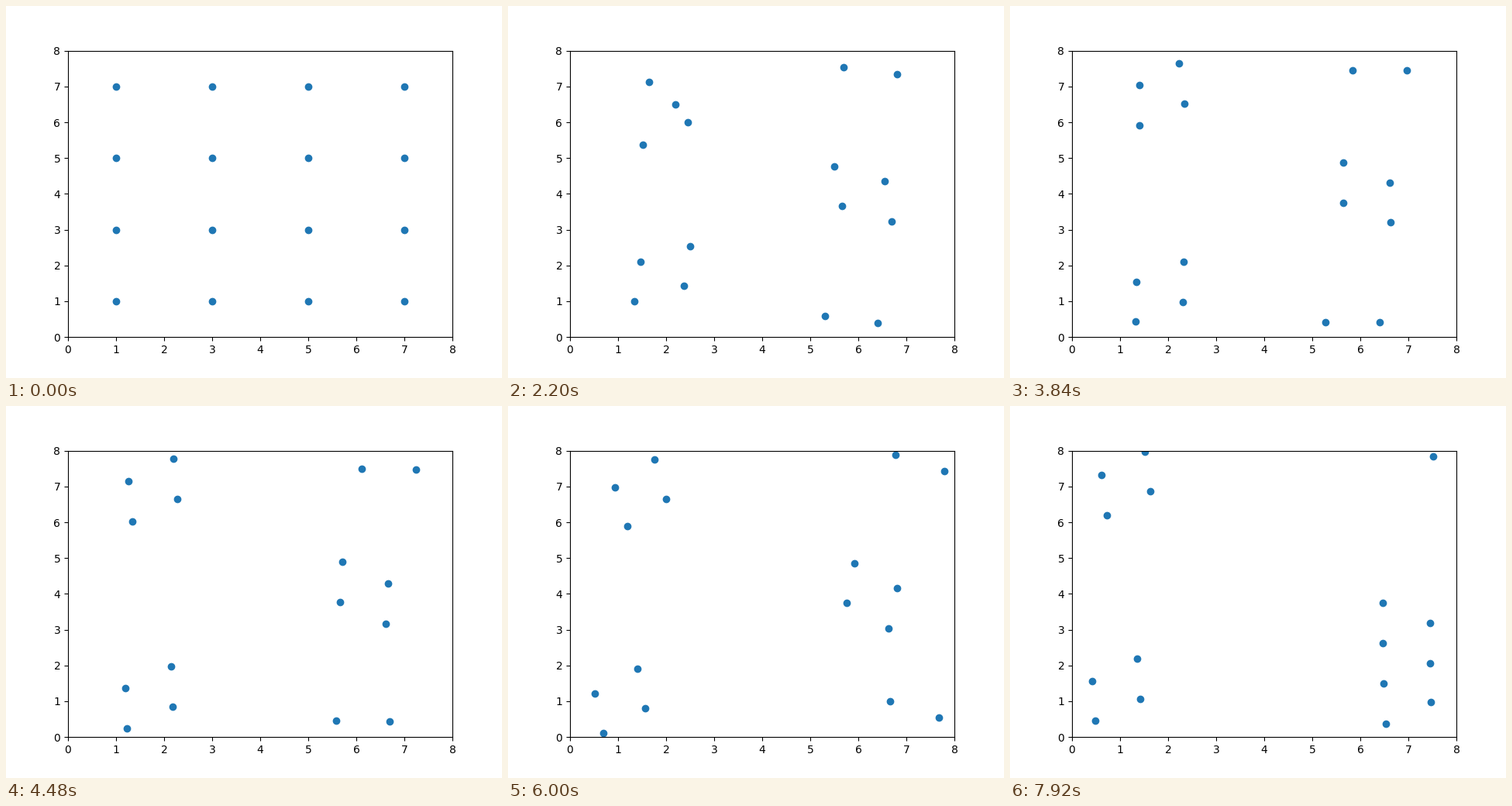
A matplotlib script for the animation above (7.96 s loop, 640 by 480 pixels).

```python
import numpy as np
import matplotlib.pyplot as plt
from matplotlib.animation import FuncAnimation

BOX = 8
FRAMES, STEP_MS = 199, 40
BOND = 2 ** (1 / 6)  # rest distance of neighbouring particles
CORNERS = np.array([(-1, -1), (1, -1), (-1, 1), (1, 1)])


def smooth(u):
    u = np.clip(u, 0, 1)
    return u * u * (3 - 2 * u)


def glide(t, keys):
    """Smooth curve through rows of (time, values...)."""
    kt, kv = keys[:, 0], keys[:, 1:]
    slope = np.gradient(kv, kt, axis=0, edge_order=2)
    i = np.clip(np.searchsorted(kt, t, side="right") - 1, 0, len(kt) - 2)
    h = (kt[i + 1] - kt[i])[:, None]
    s = (t - kt[i])[:, None] / h
    return (kv[i] + (kv[i + 1] - kv[i]) * smooth(s)
            + s * (1 - s) * h * ((1 - s) * slope[i] - s * slope[i + 1]))


def rhombus(tilt, skew, order):
    """Corner offsets of two bonds turned by tilt, per time step."""
    a = np.radians(tilt)[:, None]
    b = a + np.radians(skew)
    u = BOND / 2 * np.stack([np.cos(a), np.sin(a)], axis=-1)
    v = BOND / 2 * np.stack([np.cos(b), np.sin(b)], axis=-1)
    sides = CORNERS[order]
    return sides[:, :1] * u + sides[:, 1:] * v


def cluster(t, centre, skew, poses, rows=2.2, order=(0, 1, 2, 3)):
    """Four grid particles closing into a drifting rhombus.

    poses: (time, x, y, tilt); rows: when the two rows have closed up.
    """
    start = (0, *centre, poses[0][3])
    pose = glide(t, np.array([start, *poses]))
    bound = rhombus(pose[:, 2], skew, list(order))

    # Columns close first; particles that swap sides take longer.
    swaps = bound[0, :, 0] * CORNERS[:, 0] < 0
    close_x = smooth(t[:, None] / np.where(swaps, 4.4, 1.1))
    close_y = smooth((t[:, None] / rows - 0.25) / 0.75) + 0 * close_x
    close = np.stack([close_x, close_y], axis=-1)
    return pose[:, None, :2] + CORNERS + (bound - CORNERS) * close


t = np.arange(FRAMES) * STEP_MS / 1000
track = np.concatenate([
    cluster(t, (2, 6), 60, order=(0, 1, 3, 2), poses=[
        (2.2, 1.94, 6.25, 34), (4.48, 1.765, 6.9, 34),
        (6, 1.47, 6.82, 43), (7.92, 1.12, 7.09, 36)]),
    cluster(t, (2, 2), 60, poses=[
        (2.2, 1.92, 1.77, 23), (4.48, 1.685, 1.11, 32),
        (6, 1.045, 1.01, 38.5), (7.92, 0.92, 1.32, 33.5)]),
    cluster(t, (6, 4), 120, poses=[
        (2.2, 6.1, 4, -22), (4.48, 6.16, 4.03, -32.5),
        (6, 6.28, 3.945, -38.5), (7.92, 6.96, 2.91, -30)]),
    # straddles the top and bottom edges
    cluster(t, (6, 8), 120, rows=1.2, poses=[
        (2.2, 6.05, 7.96, -9.5), (4.48, 6.41, 7.965, -1),
        (5.4, 7.24, 8.08, -13), (6, 7.225, 8.21, -24.5),
        (7.92, 7, 8.67, -27.5)]),
], axis=1) % BOX

fig, ax = plt.subplots(figsize=(6.4, 4.8), dpi=100)
ax.set_xlim(0, BOX)
ax.set_ylim(0, BOX)
dots, = ax.plot([], [], "o", color="#1f77b4")


def draw(i):
    dots.set_data(track[i, :, 0], track[i, :, 1])
    return dots,


anim = FuncAnimation(fig, draw, frames=FRAMES, interval=STEP_MS,
                     repeat=True, repeat_delay=0)
plt.show()
```
